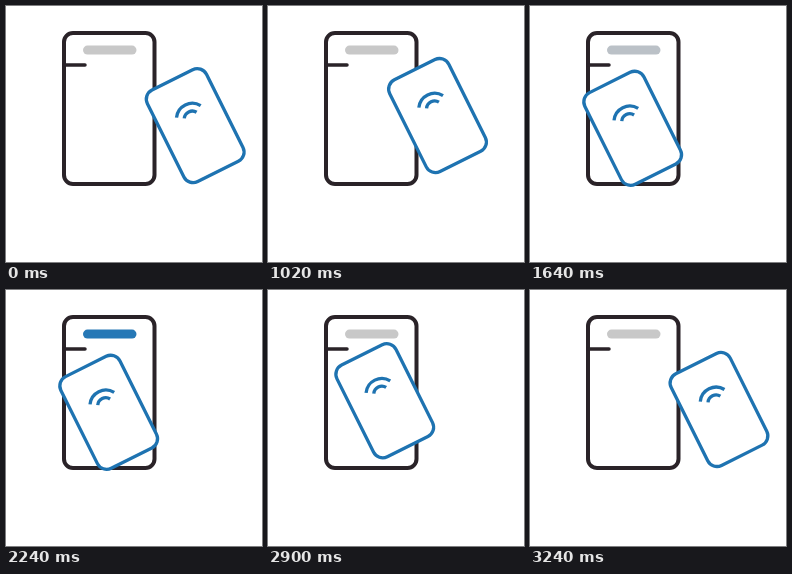
An HTML page for the animation above (5.4 s loop, 256x256 px).

```html
<!DOCTYPE html>
<html lang="en">
<head>
<meta charset="utf-8">
<title>Card tap</title>
<style>
  html, body { margin: 0; width: 100%; height: 100%; overflow: hidden; background: #fff; }
  svg { display: block; width: 100%; height: 100%; }
  .phone, .card { fill: #fff; }
  .phone { stroke: #2a2328; stroke-width: 4; stroke-linecap: round; }
  .card { stroke: #1e73b1; stroke-width: 3.3; }
  .line { stroke-width: 3.5; }
  .wave { fill: none; }
</style>
</head>
<body>
<svg viewBox="0 0 256 256">
  <g class="phone">
    <rect x="58" y="27" width="90.5" height="151" rx="9"/>
    <path class="line" d="M58 59H79"/>
  </g>
  <rect id="bar" x="77" y="39.6" width="53.5" height="9" rx="4.5"/>
  <path id="flight" d="M189.2 119.6c-25 -17 -64 -24 -86.5 2.7" fill="none"/>
  <g id="card" class="card">
    <rect x="-33" y="-51.2" width="66" height="102.4" rx="10.3"/>
    <path class="wave" d="M-13.2 -15.4a15.9 15.9 0 0 1 27 0M-6.6 -11.3a8.1 8.1 0 0 1 13.8 0"/>
  </g>
</svg>
<script>
  const LOOP = 5400;
  const GREY = [200, 200, 200], BLUE = [38, 120, 182];
  const [bar, flight, card] = ['bar', 'flight', 'card'].map(id => document.getElementById(id));
  const flightLength = flight.getTotalLength();

  // Eased progress from 0 to 1 between two times
  function ease(t, start, end) {
    const p = Math.min(1, Math.max(0, (t - start) / (end - start)));
    return p * p * (3 - 2 * p);
  }

  function draw(t) {
    const travel = ease(t, 834, 1430) - ease(t, 2762, 3256);
    const { x, y } = flight.getPointAtLength(travel * flightLength);
    card.setAttribute('transform', `translate(${x} ${y}) rotate(-26.5)`);

    // The tint switches on and off abruptly at its faint ends
    const tinted = t >= 1640 && t < 2480;
    const tint = tinted ? ease(t, 1510, 2250) - ease(t, 2300, 2500) : 0;
    const color = GREY.map((c, i) => Math.round(c + (BLUE[i] - c) * tint));
    bar.setAttribute('fill', `rgb(${color})`);
  }

  const began = performance.now();
  function frame() {
    draw((performance.now() - began) % LOOP);
    requestAnimationFrame(frame);
  }
  frame();
</script>
</body>
</html>
```
